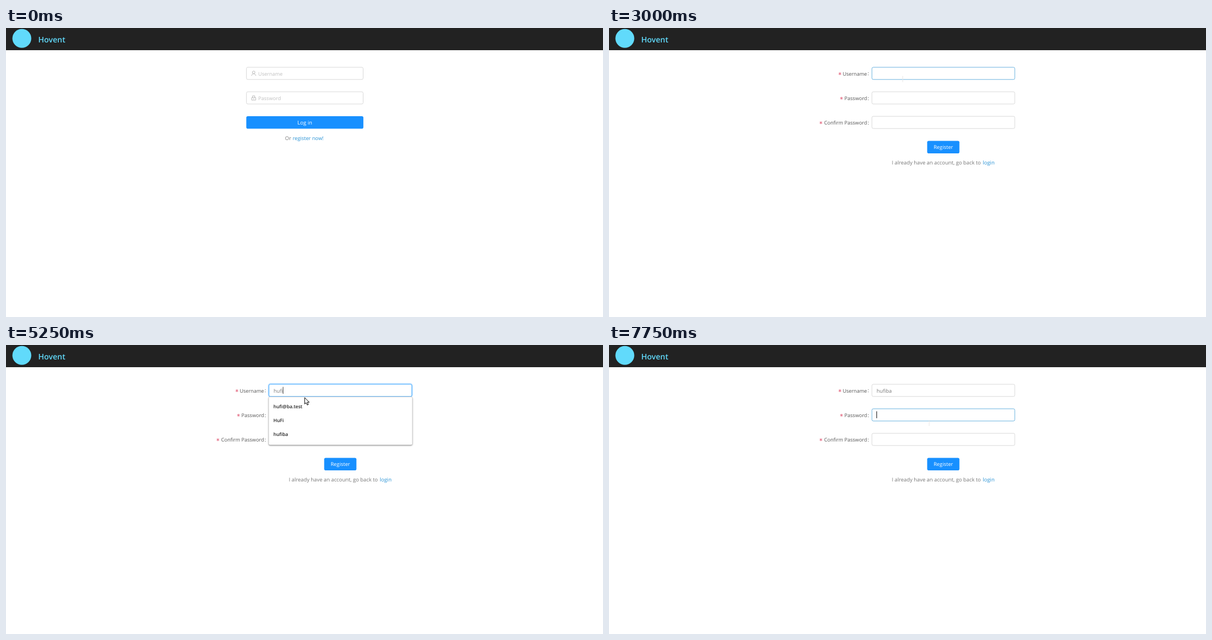
Recreate the animation shown at these times as an HTML page. Size 1074 by 521 pixels, loop 8000 ms.

```html
<!DOCTYPE html>
<html lang="en">
<head>
<meta charset="utf-8">
<title>Sign up</title>
<style>
html, body { margin: 0; width: 100%; height: 100%; overflow: hidden; background: #fff; }
svg { display: block; width: 1074px; height: 521px; }
text { font-family: "Open Sans", "Noto Sans", sans-serif; text-rendering: geometricPrecision; white-space: pre; }
.cjk { font-family: "Noto Sans CJK SC", "Noto Sans CJK", sans-serif; }
</style>
</head>
<body>
<svg id="stage" viewBox="0 0 1074 521"></svg>
<script>
const STEP = 250, LOOP = 8000;
const ROWS = [81.8, 126, 170.2];
const BLUE = '#1890ff', LINK = '#2a93d5', GREY = '#777';
const stage = document.getElementById('stage');
const pen = document.createElement('canvas').getContext('2d');

const text = (x, y, s, size, fill, extra = '') =>
  `<text x="${x}" y="${y}" font-size="${size}" fill="${fill}" ${extra}>${s}</text>`;
const rect = (x, y, w, h, fill, extra = '') =>
  `<rect x="${x}" y="${y}" width="${w}" height="${h}" fill="${fill}" ${extra}/>`;
const path = (d, stroke, width = 1, fill = 'none') =>
  `<path d="${d}" fill="${fill}" stroke="${stroke}" stroke-width="${width}"/>`;
const END = 'text-anchor="end"', MID = 'text-anchor="middle"';

function field(x, y, w, mode) {
  const glow = mode === 'focus'
    ? rect(x - 1, y - 12, w + 2, 24, 'none', 'rx="4" stroke="#1890ff" stroke-opacity=".25" stroke-width="2"') : '';
  const color = { focus: '#40a9ff', hover: '#6bb3df' }[mode] || '#d9d9d9';
  return glow + rect(x, y - 11, w, 22, '#fff', `rx="2.5" stroke="${color}"`);
}

const button = (x, y, w, label, size, fill = BLUE) =>
  rect(x, y, w, 22.6, fill, 'rx="2.8"') + text(x + w / 2, y + 15, label, size, '#fff', MID);

function header() {
  return rect(0, 0, 1074, 40, '#222') +
    '<circle cx="28.5" cy="18.7" r="17" fill="#61dafb"/>' +
    text(58, 25.6, 'Hovent', 14, '#61dafb', 'font-weight="600"');
}

function loginPage(n) {
  const user = '<circle cx="445.6" cy="80" r="2.4" fill="none" stroke="#aaa" stroke-width=".8"/>' +
    path('M441.8 86.2C442 81.4 449.2 81.4 449.4 86.2', '#aaa', .8);
  const lock = path('M442 125.6H449.2V130H442ZM443.6 125.6V122.4H447.6V125.6M445.6 127V128.6', '#aaa', .8);
  return field(432.5, ROWS[0], 210, '') + field(432.5, ROWS[1], 210, n === 2 ? 'hover' : '') + user + lock +
    text(453.8, 85.6, 'Username', 9.05, '#bfbfbf') + text(453.8, 129.8, 'Password', 9.05, '#bfbfbf') +
    button(432.3, 159, 210.6, 'Log in', 9.55, n === 3 ? '#40a9ff' : BLUE) +
    text(502, 201.8, 'Or', 9.2, GREY) +
    text(515.7, 201.8, 'register now!', 9.2, n >= 5 ? '#1777c4' : LINK);
}

function statusBar() {
  return path('M-1 509.5H353Q356.5 509.5 356.5 513V522H-1Z', '#d4d4d4', 1, '#fff') +
    text(.5, 520.4, 'localhost:3000/register', 7.9, '#666');
}

function star(x, y) {
  return path(`M${x} ${y - 2.6}v5.2M${x - 2.3} ${y - 1.4}l4.6 2.8M${x - 2.3} ${y + 1.4}l4.6 -2.8`, '#e2607a', .9);
}

function registerPage(modes) {
  const labels = [['Username', 415.4], ['Password', 418.2], ['Confirm Password', 381.2]];
  return labels.map(([name, x], i) => {
    const y = ROWS[i];
    return star(x, y + .6) + text(464.2, y + 3.9, name, 9.05, '#555', END) +
      text(465.2, y + 3.6, ':', 9, '#555') + field(473, y, 257, modes[i]);
  }).join('') + button(572.4, 203.4, 58, 'Register', 9.25) +
    text(508.8, 246, 'I already have an account, go back to', 9.36, GREY) +
    text(672.4, 246, 'login', 9.4, LINK);
}

function typed(s, composing, caret) {
  pen.font = '9.1px "Open Sans", "Noto Sans", sans-serif';
  const end = 481.5 + pen.measureText(s).width;
  return text(481.5, 85.5, s, 9.1, GREY) +
    (composing ? path(`M481.5 87.5H${end}`, '#888', .8) : '') +
    (caret ? path(`M${end + .4} 75.5V88`, '#333', .9) : '');
}

function dropdown(items) {
  const h = 10.8 + items.length * 25.2;
  return rect(472.6, 93.6, 258.4, h, '#fff',
    'rx="2" stroke="#ccc" stroke-width=".8" style="filter:drop-shadow(0 1px 1px #0005)"') +
    items.map((s, i) => text(481, 114 + i * 25.2, s, 8.5, '#222', 'font-weight="600"')).join('');
}

function imeBar(words) {
  const cell = words[0].length > 1 ? 62.5 : 42.7, left = 485, sep = left + cell * words.length;
  let out = rect(left, 89, sep + 25 - left, 31, '#fff') + rect(left, 89, cell, 31, '#3c3c3c');
  if (cell < 50) out += rect(left + cell, 89, cell, 31, '#6b6b6b');
  words.forEach((w, i) => {
    const x = left + i * cell;
    out += text(x + 11.5, 109.6, i + 1, 8, i ? '#777' : '#ddd') +
      text(x + 18.8, 110, w, 13, i ? '#000' : '#fff', 'class="cjk"');
  });
  const f = sep + 15.2;
  return out + rect(sep - 16, 91.5, 15, 26, '#e8e8e8', 'stroke="#ccc" stroke-width=".7"') +
    path(`M${sep - 12} 97.5l7.5 7 -7.5 7`, '#333') +
    path(`M${left} 89.5H${sep + 25}M${left} 119.5H${sep + 25}M${sep - .5} 89V120`, '#666') +
    `<circle cx="${f}" cy="104.5" r="5.8" fill="none" stroke="#222"/>` +
    path(`M${f - 2.2} 102v1.6M${f + 2.2} 102v1.6M${f - 3.2} 105.8q3.2 4 6.4 0`, '#222');
}

function pointer([x, y, beam]) {
  if (beam) return path(`M${x} ${y - 5.5}v11`, '#e6e6e6');
  return path(`M${x} ${y}v11.6l2.7 -2.4 1.9 4.2 2 -.9 -1.9 -4.1h3.5z`, '#000', 1, '#fff');
}

// Pointer stops: [first step, x, y, beam]
const STOPS = [
  [2, 552, 127, 1], [3, 550, 165], [4, 548, 186], [5, 546, 199.8],
  [10, 539, 146], [11, 532, 103], [12, 528.5, 92, 1], [15, 537.3, 94.8],
  [28, 552, 112], [29, 570, 126, 1], [30, 576, 140.5, 1]
];
const KEYS = [[17, 'h'], [19, 'hu'], [20, 'hufi'], [23, 'hufib'], [24, 'hufiba']];
const FULL = ['hufi@ba.test', 'hobin', 'hobinvee', 'hobinti', 'HuFi', 'hufiba'];
const latest = (list, n) => list.filter(e => e[0] <= n).pop();

function listFor(s) {
  if (s.length > 4) return ['hufiba'];
  return s.length > 2 ? [FULL[0], FULL[4], FULL[5]] : FULL;
}

function candidates(s) {
  if (s === 'h') return [...'和好还后会或很'];
  if (s === 'hu') return [...'胡湖护互户虎忽'];
  return '护肤 虎符 互访 回复 恢复 户房 会费'.split(' ');
}

function draw(n) {
  let out = rect(0, 0, 1074, 521, '#fff') + header();
  if (n < 9) {
    out += loginPage(n) + (n >= 7 ? statusBar() : '');
  } else {
    const focused = n >= 13 && n < 30;
    const s = (latest(KEYS, n) || [0, ''])[1];
    const composing = n >= 17 && n <= 20;
    out += registerPage([focused ? 'focus' : n === 12 ? 'hover' : '', n >= 30 ? 'hover' : '', '']);
    out += typed(s, composing, focused && n !== 26 && n !== 27);
    if (n === 31) out += path('M481.6 119.5V132', '#222', 1.1);
    if (n >= 14 && n < 29) out += dropdown(listFor(s));
    if (composing) out += imeBar(candidates(s));
  }
  const stop = latest(STOPS, n);
  if (stop) out += pointer(stop.slice(1));
  stage.innerHTML = out;
}

let shown = -1;
const start = performance.now();
function tick() {
  const n = Math.floor((performance.now() - start) % LOOP / STEP);
  if (n !== shown) draw(shown = n);
  requestAnimationFrame(tick);
}
tick();
</script>
</body>
</html>
```
